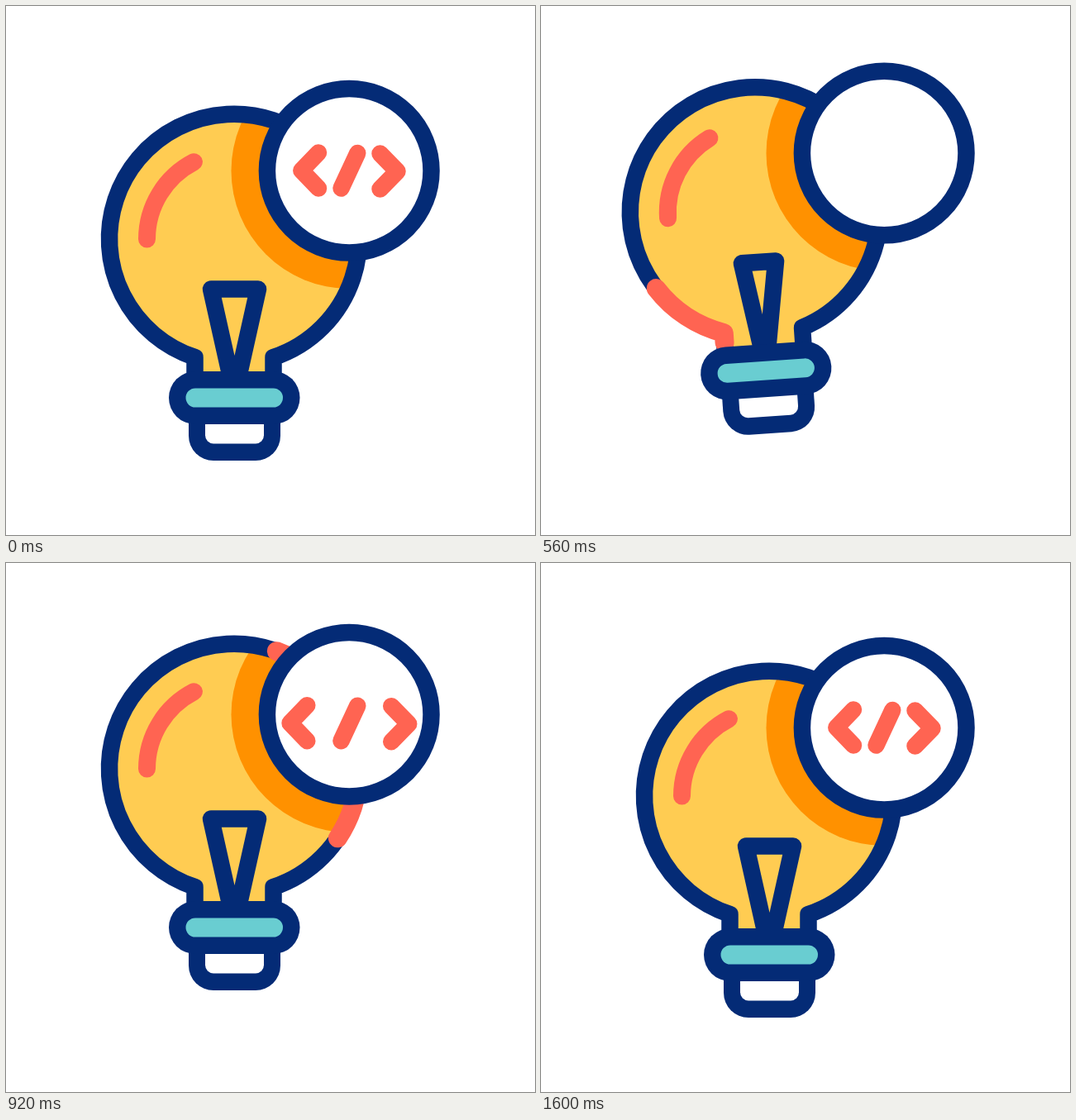
Animation, 640 px wide and 640 px high, one loop 1.96 s. Source, as an HTML page with a canvas:

```html
<!DOCTYPE html>
<html lang="en">
<head>
<meta charset="utf-8">
<title>Light bulb and code badge</title>
<style>
  html, body { margin: 0; width: 100%; height: 100%; overflow: hidden; background: #fff; }
  canvas { display: block; width: 100vw; height: 100vh; }
</style>
</head>
<body>
<canvas id="stage" width="640" height="640"></canvas>
<script>
const ctx = document.getElementById('stage').getContext('2d');
const NAVY = '#042b76', YELLOW = '#ffcc52', ORANGE = '#ff9100';
const RED = '#ff6452', TEAL = '#69cdd1', WHITE = '#fff';
const LOOP = 1960, STEP = 40;

const bulb = { x: 276, y: 281.7, r: 151, neck: 47.5, base: 452 };
const gap = Math.asin(bulb.neck / bulb.r);
const neckTop = bulb.y + bulb.r * Math.cos(gap);
const outlineLength = 2 * (bulb.base - neckTop) + bulb.r * 2 * (Math.PI - gap);
const badge = { x: 415.2, y: 199.3, r: 99.3 };

const smooth = u => u * u * (3 - 2 * u);

// Bezier easing (0.5, 0, 0.5, 1)
function ease(u) {
  let lo = 0, hi = 1;
  for (let i = 0; i < 24; i++) {
    const s = (lo + hi) / 2;
    if (1.5 * s * (1 - s) + s * s * s < u) lo = s; else hi = s;
  }
  return smooth((lo + hi) / 2);
}

// Interpolates between [time, value] keys.
function track(t, keys, curve = ease) {
  if (t <= keys[0][0]) return keys[0][1];
  for (let i = 1; i < keys.length; i++) {
    const [t0, v0] = keys[i - 1], [t1, v1] = keys[i];
    if (t < t1) return v0 + (v1 - v0) * curve((t - t0) / (t1 - t0));
  }
  return keys[keys.length - 1][1];
}

function poseAt(t) {
  return {
    lift: track(t, [[0, 0], [545, -33], [1000, -33], [1600, 0]]),
    tilt: track(t, [[320, 0], [520, -5], [680, 5], [840, -5], [1000, 5], [1215, 0]]),
    filament: track(t, [[0, 28.5], [320, 5], [730, 28.5]]),
    head: track(t, [[400, 0], [1080, 1]], smooth),
    tail: track(t, [[500, 0], [1280, 1]], smooth),
    badge: track(t, [[160, 0], [680, -23.3], [1280, 0]]),
    codeDrop: track(t, [[0, 0], [560, 119], [560, -125], [760, 10.8], [1080, 10.8], [1280, 0]]),
    codeSpread: track(t, [[720, 0], [1000, 16], [1600, 0]])
  };
}

function fill(color) {
  ctx.fillStyle = color;
  ctx.fill();
}

function stroke(color, width) {
  ctx.strokeStyle = color;
  ctx.lineWidth = width;
  ctx.stroke();
}

function line(...points) {
  ctx.beginPath();
  points.forEach(([x, y]) => ctx.lineTo(x, y));
}

function circle(x, y, r) {
  ctx.beginPath();
  ctx.arc(x, y, r, 0, 2 * Math.PI);
}

function box(x, y, w, h, radii, color) {
  ctx.beginPath();
  ctx.roundRect(x, y, w, h, radii);
  fill(color);
}

function bulbOutline() {
  const { x, y, r, neck, base } = bulb;
  ctx.beginPath();
  ctx.moveTo(x - neck, base);
  ctx.lineTo(x - neck, neckTop);
  ctx.arc(x, y, r, Math.PI / 2 + gap, 2.5 * Math.PI - gap);
  ctx.lineTo(x + neck, base);
}

function drawBulb(pose) {
  ctx.save();
  ctx.translate(276, 532 + pose.lift);
  ctx.rotate(pose.tilt * Math.PI / 180);
  ctx.translate(-276, -532);

  bulbOutline();
  fill(YELLOW);

  // The shade follows the badge but stays inside the glass.
  ctx.save();
  ctx.clip();
  ctx.resetTransform();
  circle(badge.x, badge.y + pose.badge, 142.7);
  fill(ORANGE);
  ctx.restore();

  ctx.beginPath();
  ctx.arc(275.5, 282, 105, Math.PI, Math.PI + 1.095);
  stroke(RED, 21);

  line([276.5 - pose.filament, 342.5], [276.5 + pose.filament, 342.5], [276.5, 470]);
  ctx.closePath();
  stroke(NAVY, 20.5);

  bulbOutline();
  stroke(NAVY, 20.5);

  const from = pose.tail * outlineLength, to = pose.head * outlineLength;
  if (to > from && to > 0) {
    ctx.setLineDash([to - from, 2 * outlineLength]);
    ctx.lineDashOffset = -from;
    stroke(RED, 23);
    ctx.setLineDash([]);
  }

  box(221, 480, 111, 70, [0, 0, 30, 30], NAVY);
  box(241, 500, 71, 29.5, [0, 0, 10, 10], WHITE);
  box(197, 442, 158.5, 64, 32, NAVY);
  box(217.5, 462.5, 117.5, 23, 11.5, TEAL);
  ctx.restore();
}

function drawBadge(pose) {
  const { x, y, r } = badge, spread = pose.codeSpread;
  ctx.save();
  ctx.translate(0, pose.badge);
  circle(x, y, r);
  fill(WHITE);

  ctx.save();
  ctx.clip();
  ctx.translate(0, pose.codeDrop);
  line([378 - spread, 177.5], [357.3 - spread, 199], [378 - spread, 220.5]);
  stroke(RED, 20.5);
  line([425.3, 178], [405.5, 220.5]);
  stroke(RED, 20.5);
  line([452.5 + spread, 178.5], [473.5 + spread, 200], [452.5 + spread, 221.5]);
  stroke(RED, 20.5);
  ctx.restore();

  circle(x, y, r);
  stroke(NAVY, 20.5);
  ctx.restore();
}

function render(now) {
  const t = Math.floor((now % LOOP) / STEP) * STEP;
  const pose = poseAt(t);
  ctx.fillStyle = WHITE;
  ctx.fillRect(0, 0, 640, 640);
  ctx.lineCap = ctx.lineJoin = 'round';
  drawBulb(pose);
  drawBadge(pose);
}

let start;
function tick(now) {
  start ??= now;
  render(now - start);
  requestAnimationFrame(tick);
}
render(0);
requestAnimationFrame(tick);
</script>
</body>
</html>
```
